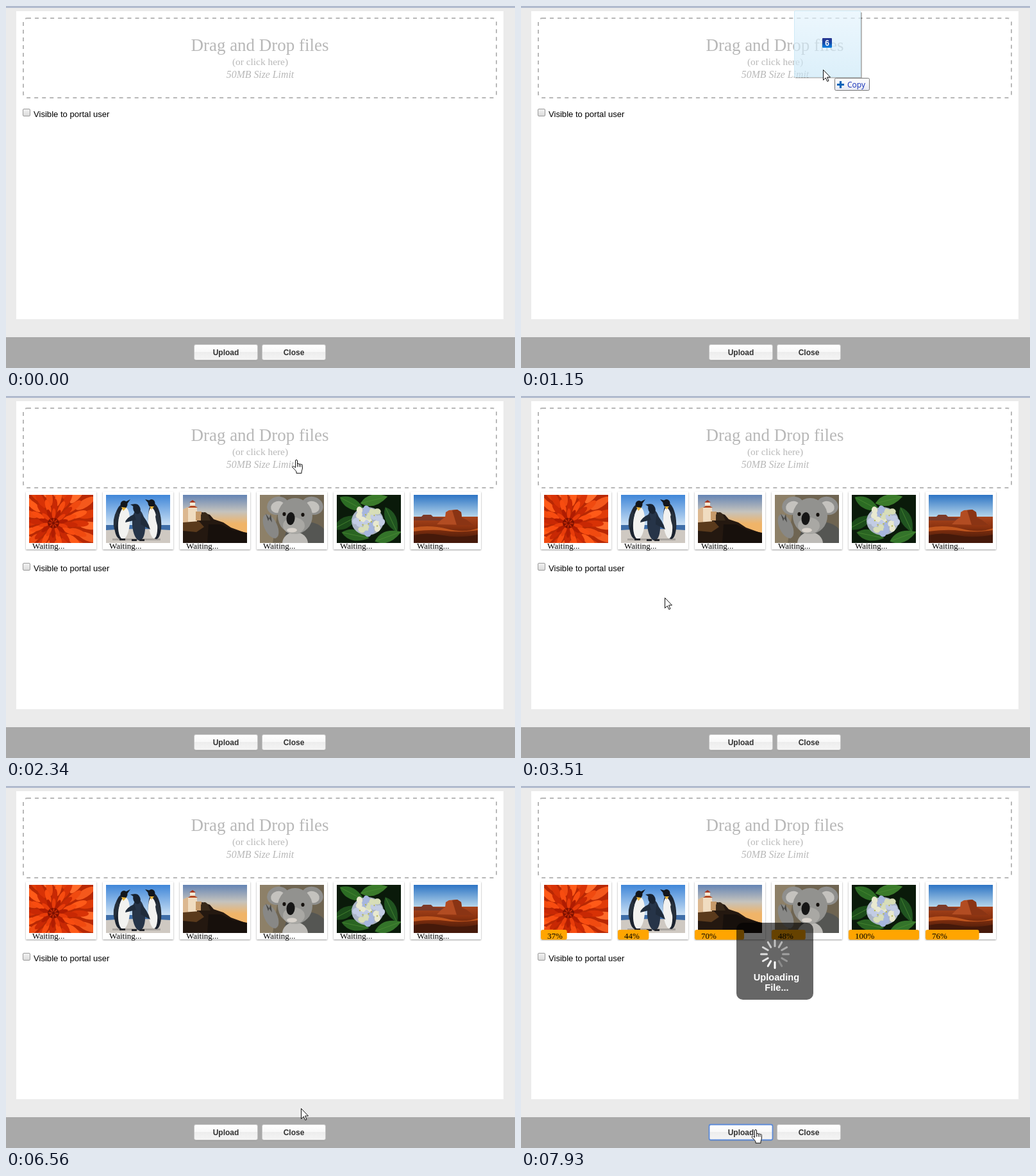
Recreate the animation shown at these times as an HTML page. Size 794 by 564 pixels, loop 8000 ms.

```html
<!DOCTYPE html>
<html lang="en">
<head>
<meta charset="utf-8">
<title>File upload</title>
<style>
  html, body { margin: 0; width: 100%; height: 100%; overflow: hidden; background: #ebebeb; }
  svg { display: block; }
  .serif { font-family: "Liberation Serif", "Times New Roman", serif; }
  .sans { font-family: "Liberation Sans", Arial, sans-serif; }
  .hint { fill: #b8b8b8; text-anchor: middle; }
  .card { font-size: 13px; }
  .bold { font-weight: bold; text-anchor: middle; }
</style>
</head>
<body>
<svg id="stage" width="794" height="564" viewBox="0 0 794 564">
  <defs>
    <linearGradient id="btn" x2="0" y2="1">
      <stop offset="0" stop-color="#fff"/><stop offset=".5" stop-color="#f8f8f8"/>
      <stop offset=".5" stop-color="#ededed"/><stop offset="1" stop-color="#f5f5f5"/>
    </linearGradient>
    <linearGradient id="btnDown" x2="0" y2="1">
      <stop offset="0" stop-color="#dcdcdc"/><stop offset=".5" stop-color="#e6e6e6"/>
      <stop offset=".5" stop-color="#dedede"/><stop offset="1" stop-color="#f2f2f2"/>
    </linearGradient>
    <linearGradient id="box" x2="0" y2="1">
      <stop offset="0" stop-color="#f2f2f2"/><stop offset="1" stop-color="#dadada"/>
    </linearGradient>
    <linearGradient id="ghost" x2="0" y2="1">
      <stop offset="0" stop-color="#e3f3fd"/><stop offset="1" stop-color="#c9e7f7"/>
    </linearGradient>
    <linearGradient id="badge" x2="0" y2="1">
      <stop offset="0" stop-color="#2a3590"/><stop offset=".5" stop-color="#1247a8"/><stop offset="1" stop-color="#0a84e4"/>
    </linearGradient>
    <linearGradient id="tip" x2="0" y2="1">
      <stop offset="0" stop-color="#fff"/><stop offset="1" stop-color="#e6e8f2"/>
    </linearGradient>
    <linearGradient id="iceSky" x2="0" y2="1">
      <stop offset="0" stop-color="#3f86d8"/><stop offset=".65" stop-color="#cfe3f5"/>
    </linearGradient>
    <linearGradient id="dusk" x2="0" y2="1">
      <stop offset="0" stop-color="#6484b4"/><stop offset=".35" stop-color="#c5c3bd"/><stop offset=".6" stop-color="#f0b468"/>
    </linearGradient>
    <linearGradient id="dry" x2="0" y2="1">
      <stop offset="0" stop-color="#2d74c4"/><stop offset=".45" stop-color="#b4d4ea"/>
    </linearGradient>
    <linearGradient id="sand" x2="0" y2="1">
      <stop offset="0" stop-color="#a8441c"/><stop offset=".4" stop-color="#8a3210"/><stop offset="1" stop-color="#3c1608"/>
    </linearGradient>
    <filter id="cardShadow" x="-10%" y="-10%" width="120%" height="120%">
      <feDropShadow dx="0" dy="1" stdDeviation="1" flood-opacity=".4"/>
    </filter>
    <clipPath id="thumb"><path d="M0 0h100v75H0z"/></clipPath>
  </defs>

  <path fill="#ebebeb" d="M0 0h794v564H0z"/>
  <path fill="#b1bace" d="M0 0h794v3H0z"/>
  <path fill="#fff" d="M16 8h760v480H16z"/>
  <path fill="#a9a9a9" d="M0 516h794v48H0z"/>

  <rect x="27" y="19" width="738" height="124" rx="6" fill="none" stroke="#b8b8b8" stroke-width="2" stroke-dasharray="6 6.04"/>
  <g class="serif hint">
    <text x="396" y="69.5" font-size="27">Drag and Drop files</text>
    <text x="396.5" y="92" font-size="15.4">(or click here)</text>
    <text x="396.5" y="112" font-size="15.8" font-style="italic">50MB Size Limit</text>
  </g>

  <g id="cards"></g>

  <g id="option">
    <rect x="26.5" y="160.5" width="11" height="11" rx="1.5" fill="url(#box)" stroke="#9b9b9b"/>
    <path id="check" d="M28.8 166.2l2.4 2.8 4.6-6.2" fill="none" stroke="#3c3c3c" stroke-width="2.1"/>
    <text class="sans" x="43" y="173" font-size="13.1">Visible to portal user</text>
  </g>

  <g id="buttons"></g>
  <g id="busy"></g>
  <g id="drag">
    <path d="M2 104.500H105V3" fill="none" stroke="#000" stroke-opacity=".28" stroke-width="2"/>
    <rect x=".5" y=".5" width="103" height="103" rx="1.5" fill="url(#ghost)" fill-opacity=".65" stroke="#cfeaf6"/>
    <rect x="44" y="43" width="15" height="15" rx="1" fill="url(#badge)"/>
    <text class="sans bold" x="51.500" y="55" font-size="12" fill="#fff">6</text>
    <rect x="63.500" y="105.500" width="54" height="19" rx="2" fill="url(#tip)" stroke="#767676"/>
    <path d="M72.500 110v11M67 115.500h11" stroke="#0a64b8" stroke-width="3.200"/>
    <text x="83" y="119.500" font-size="12" fill="#1430b8" font-family="Open Sans, sans-serif">Copy</text>
  </g>
  <g id="cursor"></g>
</svg>

<script>
const LOOP = 8000;
const $ = id => document.getElementById(id);
const range = (n, f) => Array.from({ length: n }, (_, i) => f(i)).join('');
const oval = (x, y, rx, ry, fill, turn = 0) =>
  `<ellipse cx="${x}" cy="${y}" rx="${rx}" ry="${ry}" fill="${fill}" transform="rotate(${turn} ${x} ${y})"/>`;
const area = (d, fill) => `<path d="${d}" fill="${fill}"/>`;
const back = fill => area('M0 0h100v75H0z', fill);

// Simple drawings for the thumbnails
function bloom() {
  const ring = (r, n, len, colors) => range(n, i =>
    `<ellipse cx="${r}" rx="${len}" ry="${len * .36}" fill="${colors[i % colors.length]}" transform="translate(38 44) rotate(${i * 360 / n + r})"/>`);
  return back('#b82804') +
    ring(58, 20, 17, ['#f4581c', '#e03c08', '#ff6a2a']) +
    ring(41, 18, 14, ['#ff5a18', '#d83206', '#f04a10']) +
    ring(27, 16, 11, ['#f84c10', '#c82804']) +
    ring(15, 14, 8, ['#e83c0a', '#b01c02']) +
    oval(38, 44, 9, 8, '#7c1000') + ring(5, 8, 3, ['#c42a06']);
}

function birds() {
  return back('url(#iceSky)') + area('M0 47h100v9H0z', '#3f6ea8') +
    area('M0 55q50-4 100 0v20H0z', '#cfc9c2') + area('M10 68h75v3H10z', '#a9a49f') +
    oval(24, 42, 11, 27, '#1c2430', 4) + oval(28, 44, 9, 25, '#f2f2f0', 4) +
    area('M17 24q-8 14-4 31 5-12 8-24z', '#26303c') +
    oval(28, 15, 5.5, 6, '#12161c') + area('M30 11l8-4-5 7z', '#12161c') + area('M24 19l8 1-5 5z', '#e8b43c') +
    oval(76, 41, 10, 28, '#1c2430', -5) + oval(73, 44, 7, 24, '#f2f2f0', -5) +
    area('M80 24q8 16 4 32-5-8-7-22z', '#26303c') +
    oval(71, 13, 5.5, 6, '#12161c') + area('M69 9l-8-2 6 7z', '#12161c') + area('M68 18l7 0-4 5z', '#e8b43c') +
    oval(51, 47, 10, 24, '#263448', -4) + area('M44 30q-13 6-14 13l17-4zM55 30q10 10 14 24l-15-8z', '#202c3c') +
    oval(48, 22, 5.5, 8, '#182230', -20) + area('M46 14l-8 1 6 4z', '#182230') +
    area('M40 69h8v3h-8zM52 69h8v3h-8zM21 68h9v3h-9z', '#22242a');
}

function tower() {
  return back('url(#dusk)') +
    area('M0 41l12-4 18-10 12 4 6 7 15 5 12 8 25 9v20H0z', '#241810') +
    area('M40 46l20 0 18 9 22 4v16H38z', '#17100c') +
    area('M0 23l7-4 6 5v19H0z', '#dcb890') + area('M8 20h14v25H8z', '#f0dcc0') + area('M20 26h9v14h-9z', '#c69a6a') +
    area('M8 20l7-5 8 5z', '#b44a24') + area('M11 12h8v5h-8z', '#f4e8d4') + area('M10 12l5-4 5 4z', '#a83820') +
    area('M0 43l25-2 8 9-12 8-21-2z', '#5a3a1c') + area('M28 31q6-8 11 0l4 9H28z', '#38291a');
}

function bear() {
  const ear = (x, turn) => oval(x, 17, 17, 14, '#8f8f8d', turn) + oval(x, 19, 11, 9, '#c4c2be', turn);
  return back('#6f6552') + area('M0 0h32l-12 75H0z', '#8d8068') +
    oval(72, 66, 33, 24, '#555653') + oval(55, 76, 20, 18, '#bdbbb7') +
    ear(28, -15) + ear(82, 15) +
    oval(55, 33, 27, 28, '#92928f') + oval(53, 48, 17, 13, '#a9a8a4') +
    oval(48, 37, 6.5, 10, '#161616', 5) + oval(38, 30, 2.6, 3, '#15110e') + oval(67, 31, 2.6, 3, '#15110e') +
    oval(50, 55, 8, 3.500, '#d9d3cc') +
    oval(17, 49, 10, 20, '#888886', -25) + area('M9 29l4 12 4-11 2 13z', '#4a4a48');
}

function cluster() {
  const leaf = (x, y, turn, fill) =>
    `<path transform="translate(${x} ${y}) rotate(${turn})" d="M-22 0Q-4-17 22 0Q-4 17-22 0z" fill="${fill}"/><path transform="translate(${x} ${y}) rotate(${turn})" d="M-20 0H20" stroke="#4c8c34" stroke-width=".7"/>`;
  return back('#0a1a0a') + leaf(24, 14, 28, '#2c6c24') + leaf(58, 8, -14, '#3a7a2a') + leaf(14, 43, -28, '#1c4c1a') +
    leaf(85, 39, 65, '#205420') + leaf(29, 63, 12, '#2a6422') + leaf(80, 65, -20, '#34742a') +
    oval(48, 41, 25, 22, '#aab4c4') +
    range(22, i => {
      const a = i * 2.4, r = 4.7 * Math.sqrt(i);
      return oval(49 + r * Math.cos(a), 40 + r * Math.sin(a), 5.6, 4.6,
        ['#e8e8d0', '#c2cce4', '#d8deb8', '#a6b6de'][i % 4], i * 40);
    }) +
    range(7, i => oval(36 + i * 4.5, 40 + 9 * Math.sin(i * 2.3), 1.2, 1.2, '#b8b858'));
}

function mesa() {
  return back('url(#dry)') + area('M0 34h100v41H0z', 'url(#sand)') +
    area('M0 35l12-1 3-3 12 0 4 4 16 1v4H0z', '#7c3a28') +
    area('M36 46l8-8 5-3 1-8 5-3 13-1 6 4 1 8 8 4 11 8z', '#b24c22') +
    area('M60 24l8-1 6 4 1 8 8 4 11 8H67z', '#8a3414') +
    area('M0 51q25-5 52 2t48-1v3q-30 4-50 1T0 57z', '#c0561e') +
    area('M0 63q20-5 45 0t55-1v13H0z', '#45190a');
}

const files = [
  ['Chrysanthem…', bloom], ['Penguins.jpg', birds], ['Lighthouse.jpg', tower],
  ['Koala.jpg', bear], ['Hydrangeas.jpg', cluster], ['Desert.jpg', mesa]
];

$('cards').innerHTML = files.map(([name, draw], i) => `
  <g class="serif card" transform="translate(${31 + i * 120} 149)">
    <rect width="110" height="90" rx="1" fill="#fff" filter="url(#cardShadow)"/>
    <path d="M5 5h100v75H5z" fill="#ebebeb"/>
    <text x="55" y="44" text-anchor="middle">${name}</text>
    <g class="photo" transform="translate(5 5)" clip-path="url(#thumb)">${draw()}</g>
    <rect class="bar" y="75" height="15.500" rx="3" fill="#ffa500"/>
    <text class="state" x="10" y="89"></text>
  </g>`).join('');

$('buttons').innerHTML = [['Upload', 293], ['Close', 399]].map(([label, x]) => `
  <rect x="${x + .5}" y="528.5" width="99" height="24" rx="2.500" fill="#8c8c8c"/>
  <rect class="face" x="${x + .5}" y="527.5" width="99" height="24" rx="2.500" fill="url(#btn)" stroke="#c4c4c4"/>
  <text class="sans bold" x="${x + 50}" y="544" font-size="12" fill="#333">${label}</text>`).join('');

$('busy').innerHTML = `
  <rect x="336" y="213" width="120" height="120" rx="10" fill-opacity=".6"/>
  <g id="spokes" stroke="#fff" stroke-width="3" stroke-linecap="round">${range(12, i =>
    `<path d="M0-12.500V-21.500" transform="translate(396 262) rotate(${i * 30})"/>`)}</g>
  <g class="sans bold" font-size="14.600" fill="#fff">
    <text x="398.500" y="303">Uploading</text><text x="399" y="319">File...</text>
  </g>`;

const pen = (d, fill = '#fff') => `<path d="${d}" fill="${fill}" stroke="#111" stroke-linejoin="round"/>`;
const pointers = {
  none: '',
  arrow: pen('M.5.5V16.500L4.200 13 6.800 18.500 9 17.500 6.500 12H11.500z'),
  hand: pen('M5.500 12.500V2a1.500 1.500 0 0 1 3 0V7.500a1.400 1.400 0 0 1 2.800.4a1.300 1.300 0 0 1 2.600.5a1.200 1.200 0 0 1 2.500.9V14c0 2-1.400 3-1.400 5v2.300H7V19C6 17 3 14.500 1.200 12.200c-.9-1.200.8-2.400 2-1.400z') +
    pen('M8.500 7.500v4M11.300 8v3.500M13.900 8.600v3', 'none'),
  beam: pen('M0 .5h3M4 .5h3M3.500 1v14M0 15.500h3M4 15.500h3', 'none')
};

const dragPath = [
  [500, 649, 89], [650, 603, 72], [770, 555, 48], [890, 503, 25], [1010, 450, 9], [1150, 426, 7], [1270, 398, 6]
];
const cursorPath = [
  [0, 'none', 0, 0],
  ...dragPath.map(([t, x, y]) => [t, 'arrow', x + 45, y + 92]),
  [1670, 'arrow', 445, 99], [1820, 'hand', 446, 99], [3090, 'hand', 440, 110],
  [3240, 'arrow', 291, 226], [3370, 'arrow', 296, 223], [3510, 'arrow', 224, 314],
  [3660, 'arrow', 178, 305], [3780, 'arrow', 128, 294], [3900, 'arrow', 90, 284], [4030, 'arrow', 70, 278],
  [4310, 'beam', 71, 265], [4450, 'beam', 71, 264], [4760, 'beam', 52, 264], [4890, 'beam', 38, 265],
  [5030, 'arrow', 32, 268], [5150, 'arrow', 30, 268], [5270, 'arrow', 29, 267],
  [6430, 'arrow', 130, 345], [6560, 'arrow', 460, 502], [6680, 'hand', 441, 545],
  [6830, 'hand', 420, 538], [6950, 'hand', 385, 531], [7070, 'hand', 359, 535]
];
const progress = [
  [7630, 14, 20, 40, 22, 60, 56], [7780, 26, 32, 55, 35, 82, 56], [7930, 37, 44, 70, 48, 100, 76]
];

const at = (list, t) => list.filter(k => k[0] <= t).pop();
const show = (el, on) => el.setAttribute('display', on ? 'inline' : 'none');
const place = (el, x, y) => el.setAttribute('transform', `translate(${x} ${y})`);
const all = sel => [...document.querySelectorAll(sel)];
const photos = all('.photo'), bars = all('.bar'), states = all('.state');
const spokes = [...$('spokes').children], upload = all('.face')[0];
let pointer = '';

function drawCursor(t) {
  const [, kind, x, y] = at(cursorPath, t);
  if (kind !== pointer) $('cursor').innerHTML = pointers[pointer = kind];
  place($('cursor'), x, y);
}

function drawUpload(t) {
  const down = t >= 7350 && t < 7510, focus = t >= 7350;
  upload.setAttribute('fill', down ? 'url(#btnDown)' : 'url(#btn)');
  upload.setAttribute('stroke', focus ? '#5c8ad8' : '#c4c4c4');
  upload.setAttribute('stroke-width', focus ? 1.8 : 1);
}

function drawFiles(t) {
  const values = at(progress, t);
  photos.forEach(p => show(p, t >= 2340));
  bars.forEach((bar, i) => {
    const v = values ? values[i + 1] : 0;
    bar.setAttribute('width', v * 1.1);
    states[i].textContent = values ? v + '%' : 'Waiting...';
  });
}

function render(t) {
  const added = t >= 1820, dragging = t >= 500 && t < 1670;
  show($('cards'), added);
  place($('option'), 0, added ? 100 : 0);
  show($('check'), t >= 5410 && t < 6160);
  show($('drag'), dragging);
  if (dragging) place($('drag'), ...at(dragPath, t).slice(1));
  show($('busy'), t >= 7510);
  const turn = [7510, 7630, 7780, 7930].filter(k => k <= t).length - 4;
  spokes.forEach((s, i) => s.setAttribute('opacity', 1 - .068 * ((i + 18 - turn) % 12)));
  drawFiles(t);
  drawUpload(t);
  drawCursor(t);
}

const start = performance.now();
function tick() {
  render((performance.now() - start) % LOOP);
  requestAnimationFrame(tick);
}
tick();
</script>
</body>
</html>
```
